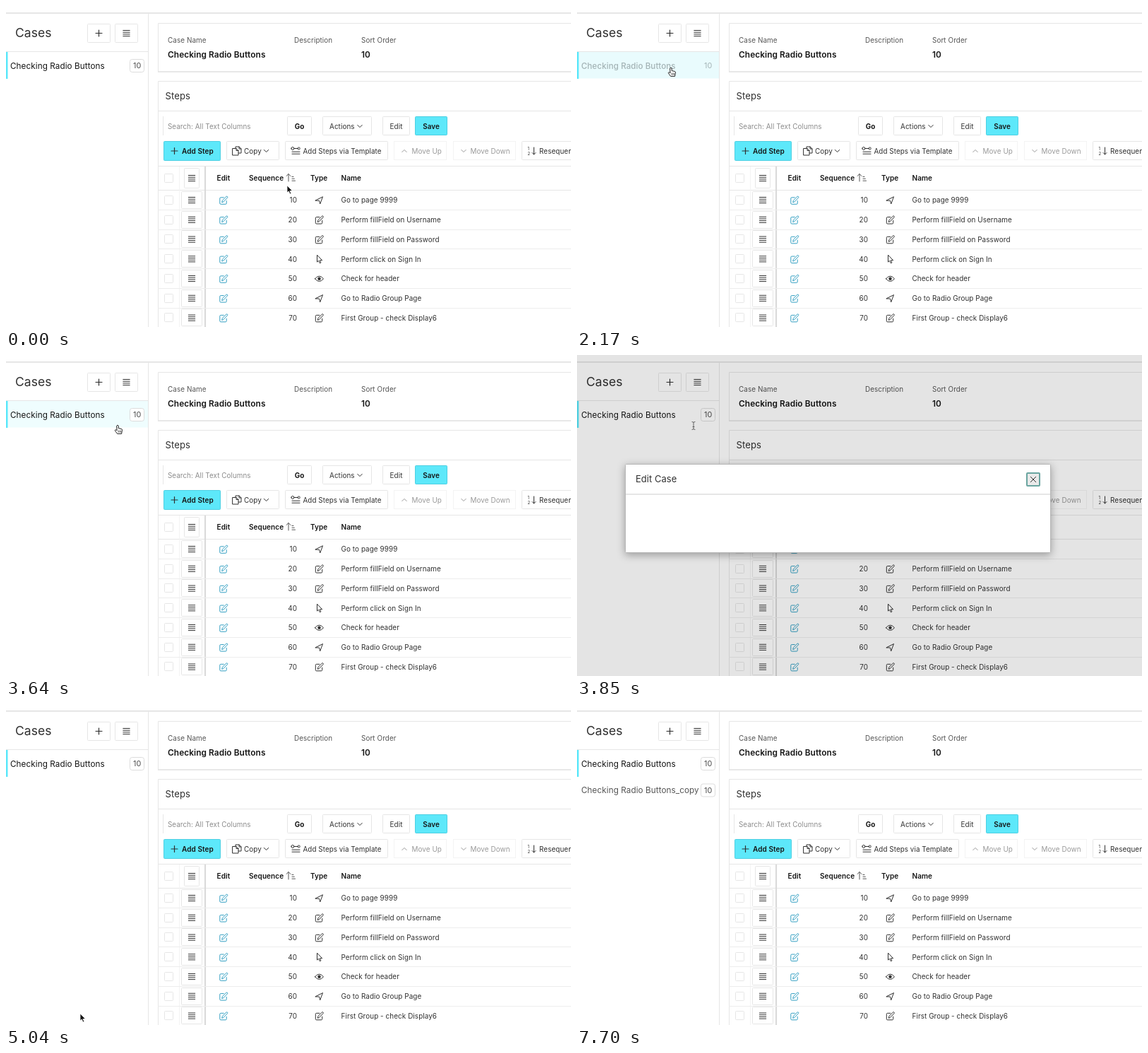
An HTML page that plays this animation: 800 by 454 pixels, repeating every 7.98 s.

```html
<!DOCTYPE html>
<html lang="en">
<head>
<meta charset="utf-8">
<title>Cases</title>
<style>
html, body { margin: 0; width: 100%; height: 100%; overflow: hidden; background: #fff; }
svg { display: block; font-family: Inter, "Open Sans", sans-serif; letter-spacing: .08px; cursor: default; }
.pop { filter: drop-shadow(0 3px 6px rgba(0,0,0,.32)); }
</style>
</head>
<body>
<svg width="800" height="454" viewBox="0 0 800 454"><g id="page"></g><g id="live"></g></svg>
<script>
const CYAN = '#5de8fa', EDGE = '#4dcfe2', INK = '#303030', LINE = '#e6e6e6', BLUE = '#329fc2';

const rect = (x, y, w, h, fill, stroke = 'none', r = 0) =>
  `<rect x="${x}" y="${y}" width="${w}" height="${h}" rx="${r}" fill="${fill}" stroke="${stroke}"/>`;
const text = (x, mid, s, size = 9.9, fill = INK, weight = 400, anchor = 'start') =>
  `<text x="${x}" y="${mid + size * .36}" font-size="${size}" fill="${fill}" font-weight="${weight}" text-anchor="${anchor}">${s}</text>`;
const line = (d, color = LINE, w = 1) => `<path d="${d}" fill="none" stroke="${color}" stroke-width="${w}"/>`;
const icon = (d, x, y, color = INK, fill = 'none', w = 1) =>
  `<path d="${d}" transform="translate(${x} ${y})" fill="${fill}" stroke="${color}" stroke-width="${w}" stroke-linejoin="round" stroke-linecap="round"/>`;
const button = (x, y, w, h) => rect(x + .5, y + .5, w, h, '#fff', LINE, 1);

const SHAPE = {
  plus: 'M-4.5 0H4.5M0-4.5V4.5',
  menu: 'M-4.7-4H4.7M-4.7-1.3H4.7M-4.7 1.4H4.7M-4.7 4.1H4.7',
  down: 'M-3.2-1.6L0 1.6L3.2-1.6',
  up: 'M-3.2 1.6L0-1.6L3.2 1.6',
  edit: 'M.3-4H-3.8Q-5.2-4-5.2-2.7V4.2Q-5.2 5.5-3.8 5.5H2.8Q4.2 5.5 4.2 4.2V.8M-2.2 2.6L-1.6 .2L4-5.4Q4.8-5.9 5.5-5.2Q6.1-4.5 5.5-3.7L0 2Z',
  go: 'M-5.3 .2L5-5L1.2 5.2L.1 .8Z',
  point: 'M-3-5.5V4L-.9 2.2L.8 5.7L2.4 5L.8 1.7H3.8Z',
  eye: 'M-6 0Q0-7.5 6 0Q0 7.5-6 0Z',
  copy: 'M-2-4V-6H3L6-3V3H2M3-6V-3H6M-6-3.5H-1L2-.5V6H-6ZM-1-3.5V-.5H2',
  template: 'M-2-3.5H3M-6.2-3.5a2 2 0 1 0 4 0a2 2 0 1 0-4 0M3-3.5a1.6 1.6 0 1 0 3.2 0a1.6 1.6 0 1 0-3.2 0M-5 1.2H6M-5 4.2H6',
  pencil: 'M-5 5L-4 1.8L3-5.2L5.2-3L-1.8 4ZM1.5-3.7L3.7-1.5',
  clone: 'M-1.5-5.5H5.5V1.5H-1.5Z',
  toggle: 'M-3.2-3H3.2A3 3 0 0 1 3.2 3H-3.2A3 3 0 0 1-3.2-3ZM-3.2-3A3 3 0 0 1-3.2 3'
};

function buildPage() {
  let s = rect(0, 0, 800, 454, '#fff') + line('M0 10H800', '#dedede', 1.6);
  // sidebar head
  s += line('M201.5 11V454M0 64.5H201') + text(13, 38, 'Cases', 17.5);
  s += button(115, 25, 32, 26) + icon(SHAPE.plus, 131.5, 38.5, INK, 'none', 1.2);
  s += button(154, 25, 32, 26) + icon(SHAPE.menu, 170.5, 38.5);
  // case summary
  s += line('M215.5 93V24.5H800') + line('M215 93H800', '#e0e0e0', 1.6);
  [[229, 'Case Name'], [408, 'Description'], [503, 'Sort Order']].forEach(([x, label]) => s += text(x, 48.4, label, 9.9, '#555'));
  s += text(229, 69, 'Checking Radio Buttons', 11.85, '#151515', 600) + text(503, 69, '10', 11.85, '#151515', 600);
  // toolbar
  s += line('M215.5 454V106.5H800M215 148.5H800') + text(225.5, 127, 'Steps', 13.1);
  s += line('M222.5 156V183') + text(229, 170, 'Search: All Text Columns', 9.8, '#8c8c8c');
  s += button(398, 156, 34, 26) + text(415.5, 170, 'Go', 9.9, '#151515', 700, 'middle');
  s += button(448, 156, 69, 26) + text(458, 170, 'Actions') + icon(SHAPE.down, 501, 170);
  s += button(533, 156, 38, 26) + text(552.5, 170, 'Edit', 9.9, INK, 400, 'middle');
  s += rect(579.5, 156.5, 45, 26, CYAN, EDGE, 1) + text(602, 170, 'Save', 9.9, '#151515', 600, 'middle');
  s += rect(223.5, 191.5, 80, 27, CYAN, EDGE, 1) + icon(SHAPE.plus, 238.5, 205, INK, 'none', 1.2) + text(249, 205, 'Add Step', 10, '#151515', 600);
  s += button(312, 191, 74, 26) + icon(SHAPE.copy, 327, 205) + text(337, 205, 'Copy') + icon(SHAPE.down, 368.5, 205);
  s += button(395, 191, 145, 26) + icon(SHAPE.template, 410, 205) + text(420.5, 205, 'Add Steps via Template', 9.8);
  s += rect(549.5, 191.5, 74, 26, '#fff', '#f3f3f3') + icon(SHAPE.up, 564, 205, '#999') + text(574.5, 205, 'Move Up', 9.9, '#999');
  s += rect(633.5, 191.5, 88, 26, '#fff', '#f3f3f3') + icon(SHAPE.down, 648, 205, '#999') + text(657.5, 205, 'Move Down', 9.9, '#999');
  s += button(730, 191, 90, 26) + text(738.5, 202, '1', 6) + text(738.5, 208.5, '2', 6);
  s += icon('M0-5V5M-2.5 2.5L0 5L2.5 2.5', 747.5, 205) + text(755, 205, 'Resequence');
  // grid
  s += line('M215 226.5H800M215 260.5H800') + line('M245.5 227V454', '#f3f3f3') + line('M282 227V454', '#d9d9d9', 2);
  s += rect(224.5, 237.5, 12, 12, '#fff', LINE, 1) + button(252, 229, 21, 28) + icon(SHAPE.menu, 263, 243.5);
  [[298.5, 'Edit'], [344, 'Sequence'], [431, 'Type'], [474.5, 'Name']].forEach(([x, label]) => s += text(x, 243.5, label, 10, '#151515', 600));
  s += icon('M-3 5V-5.5M-6-2.5L-3-5.5L0-2.5M2-1.5H4M2 1.3H5.3M2 4.2H6.5', 403, 243, '#555');
  const steps = [
    ['go', 'Go to page 9999'], ['edit', 'Perform fillField on Username'], ['edit', 'Perform fillField on Password'],
    ['point', 'Perform click on Sign In'], ['eye', 'Check for header'], ['go', 'Go to Radio Group Page'], ['edit', 'First Group - check Display6']
  ];
  steps.forEach(([type, name], i) => {
    const y = 274.8 + i * 27.75;
    s += line(`M215 ${Math.round(y + 13) + .5}H800`, '#ededed');
    s += rect(224.5, Math.round(y) - 6.5, 12, 12, '#fff', LINE, 1);
    s += button(248, Math.round(y) - 13, 29, 24) + icon(SHAPE.menu, 263, y - .3);
    s += icon(SHAPE.edit, 308, y, BLUE) + text(412, y, 10 * (i + 1), 9.9, INK, 400, 'end');
    s += icon(SHAPE[type], 443.5, y) + text(474.5, y, name);
    if (type === 'eye') s += `<circle cx="443.5" cy="${y}" r="2.2" fill="${INK}"/>`;
  });
  return s;
}

function caseRow(mid, name, color, badge, weight = 400) {
  return text(6, mid, name, weight > 400 ? 11.55 : 11.7, color, weight) +
    (badge ? rect(175.5, mid - 9, 20, 18, '#fff', '#dcdcdc', 3) : '') +
    text(185.7, mid, '10', 10.8, badge ? '#4a4a4a' : color, 400, 'middle');
}

function contextMenu(x, y, mouse, toggleLabel) {
  const labels = ['Edit Case', 'Duplicate Case', toggleLabel, 'Edit Variable Values'];
  const over = mouse.x > x + 3 ? Math.floor((mouse.y - y - 7.5) / 30) : -1;
  let s = `<g class="pop">${rect(x + .5, y + .5, 161, 134.5, '#fff', '#d4d4d4', 1)}</g>`;
  labels.forEach((label, i) => {
    const mid = y + 22.4 + i * 30.1, ix = x + 14.5;
    if (i === over) s += rect(x + 1, mid - 15, 160.5, 30, CYAN);
    s += i === 3 ? `<g letter-spacing="1">${text(ix, mid, '( x )'.replace(/ /g, ''), 10.2, INK, 400, 'middle')}</g>`
      : icon(SHAPE[['pencil', 'clone', 'toggle'][i]], ix, mid, '#444', 'none', .9);
    if (i === 1) s += `<path d="M${ix - 5.5} ${mid - 1.5}h7v7h-7z" fill="#fff" stroke="#444" stroke-width=".9" stroke-dasharray="2 1.5"/>`;
    s += text(x + 28, mid, label);
  });
  return s;
}

function dialog(t) {
  const [y, h] = t < 3990 ? [154, 126] : [14, 439];
  return rect(0, 0, 800, 454, 'rgba(0,0,0,.105)') +
    `<g class="pop">${rect(68.5, y + .5, 602, h - 1, '#fff', '#b5b5b5', 1)}</g>` +
    line(`M69 ${y + 43}H670`, '#dedede', 1.4) + text(83, y + 21.7, 'Edit Case', 12.9) +
    `<rect x="637" y="${y + 13}" width="18" height="18" rx="1" fill="#e9e9e9" stroke="#6aa5a0" stroke-width="2"/>` +
    icon('M-3.7-3.7L3.7 3.7M3.7-3.7L-3.7 3.7', 646, y + 22);
}

// pointer stops: time, x, y
const PATH = [
  [0, 398, 254], [140, 398, 254], [630, 122, 86], [840, 122, 86], [1120, 151, 160], [1400, 151, 160],
  [1820, 133, 87], [2240, 133, 87], [2590, 164, 162], [2800, 164, 162], [3080, 132, 86], [3290, 132, 86],
  [3570, 158, 99], [3640, 158, 99], [3850, 165, 100], [4130, 165, 100], [4690, 105, 438], [5110, 105, 438],
  [5600, 122, 86], [5740, 122, 86], [6090, 150.5, 159.5], [6230, 150.5, 159.5], [6440, 154, 133], [7000, 154, 133],
  [7560, 305, 438], [7630, 320, 470]
];
// context menus: open, close, x, y, third item
const MENUS = [
  [700, 1260, 122, 86, 'Disable'], [2240, 2730, 133, 87, 'Enable'],
  [3150, 3610, 132, 86, 'Disable'], [5670, 6510, 122, 86, 'Disable']
];
const during = (t, a, b) => t >= a && t < b;

function pointerAt(t) {
  const i = PATH.findIndex(p => p[0] > t);
  if (i < 0) return { x: 320, y: 470 };
  const [t0, x0, y0] = PATH[i - 1], [t1, x1, y1] = PATH[i];
  const u = (t - t0) / (t1 - t0), e = u * u * (3 - 2 * u);
  return { x: x0 + (x1 - x0) * e, y: y0 + (y1 - y0) * e };
}

function cursor(kind, { x, y }) {
  if (kind === 'beam') return icon('M-2-5.5Q0-5.5 0-4.5Q0-5.5 2-5.5M0-4.5V4.5M-2 5.5Q0 5.5 0 4.5Q0 5.5 2 5.5M-1 1.5H1', x, y, '#444', 'none', .8);
  if (kind === 'hand') return icon('M-1.2 1Q0-.8 1.2 1V4.6L5.2 5.4Q6.6 5.8 6.5 7.2L5.6 12.4H-.4Q-2.6 9.6-3.8 7.4Q-3.2 5.8-1.2 7.4Z', x, y, '#222', '#fff') +
    icon('M1 10.3V8M2.8 10.3V8M4.5 10.3V8', x, y, '#222', 'none', .7);
  return icon('M0 0V10L2.3 8L4 12L5.8 11.2L4.1 7.5H7.3Z', x, y, '#fff', '#111', .8);
}

function liveParts(t) {
  const mouse = pointerAt(t);
  const menu = MENUS.find(m => during(t, m[0], m[1]));
  const modal = during(t, 3710, 4900);
  const disabled = during(t, 1400, 2870);
  const onRow = mouse.x < 201 && mouse.y > 65 && mouse.y < 103;
  const hover = onRow && !menu && !modal;
  let s = hover ? rect(0, 65, 201, 37.5, disabled ? '#e9fbfd' : '#effdfe') : '';
  s += rect(0, 65, 2.5, 38, CYAN);
  s += disabled ? caseRow(84.5, 'Checking Radio Buttons', '#a3b3b5', false, 500) : caseRow(84.5, 'Checking Radio Buttons', '#151515', true);
  if (t >= 6930) s += caseRow(122, 'Checking Radio Buttons_copy', '#555', true);
  if (menu) s += contextMenu(menu[2], menu[3], mouse, menu[4]);
  if (modal) s += dialog(t);
  return s + cursor(modal && onRow ? 'beam' : hover || menu ? 'hand' : 'arrow', mouse);
}

const live = document.getElementById('live');
document.getElementById('page').innerHTML = buildPage();
let last = -1;
function tick() {
  const t = Math.floor(performance.now() % 7980 / 70) * 70;
  if (t !== last) live.innerHTML = liveParts(last = t);
  requestAnimationFrame(tick);
}
tick();
</script>
</body>
</html>
```
